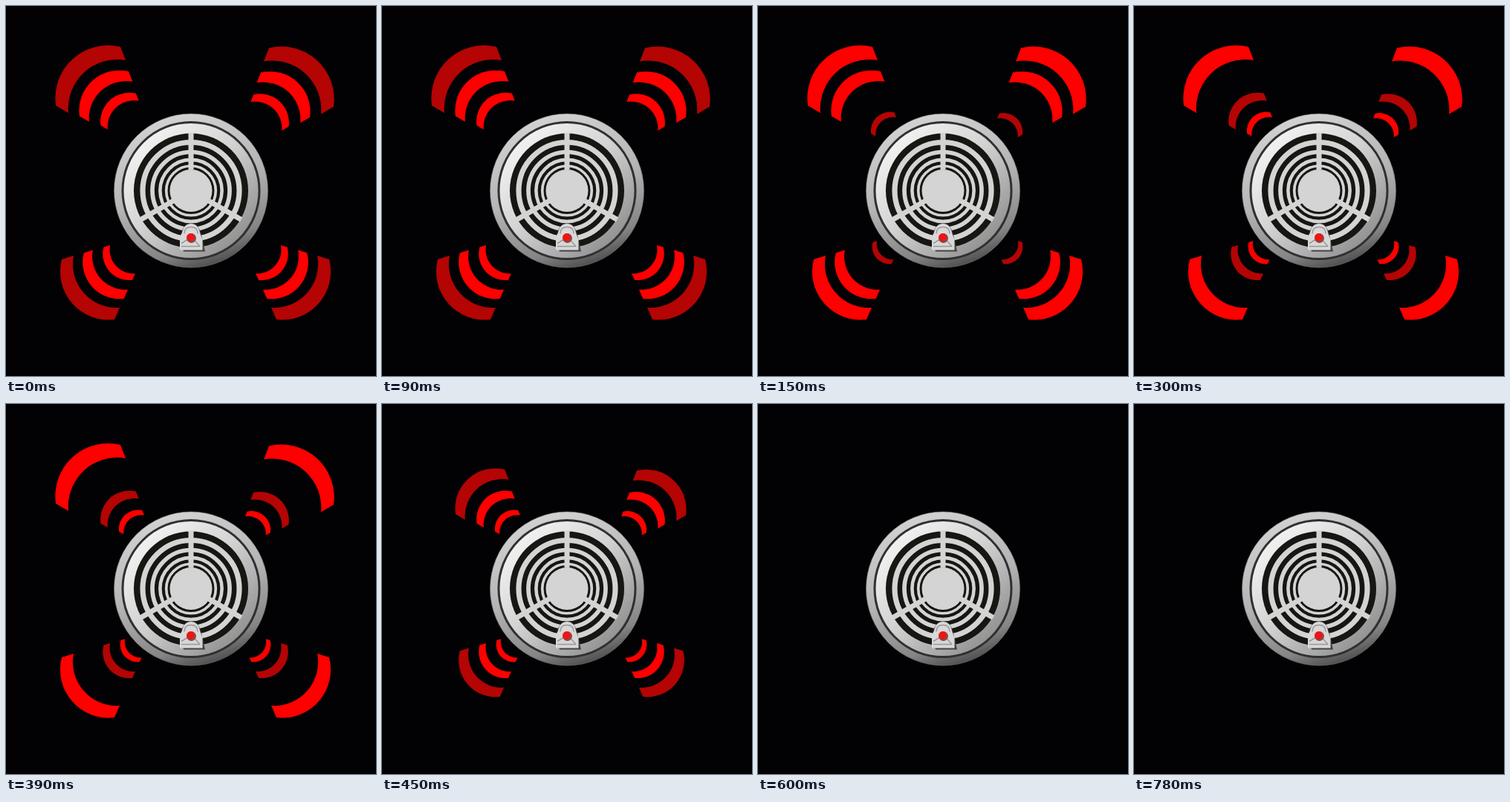
An HTML page for the animation above (0.9 s loop, 498 by 498 pixels).

```html
<!DOCTYPE html>
<html lang="en">
<head>
<meta charset="utf-8">
<title>Smoke alarm</title>
<style>
html, body { margin: 0; width: 100%; height: 100%; overflow: hidden; background: #020103; }
svg { display: block; width: 100%; height: 100%; }
</style>
</head>
<body>
<svg viewBox="0 0 498 498">
  <defs>
    <linearGradient id="rim" x1=".3" y1="0" x2=".62" y2="1">
      <stop offset="0" stop-color="#d4d4d4"/>
      <stop offset=".5" stop-color="#b4b4b4"/>
      <stop offset=".85" stop-color="#858585"/>
      <stop offset="1" stop-color="#4c4c4c"/>
    </linearGradient>
    <linearGradient id="face" x1=".12" y1=".15" x2=".82" y2=".9">
      <stop offset="0" stop-color="#f2f2f2"/>
      <stop offset=".45" stop-color="#d4d4d4"/>
      <stop offset="1" stop-color="#929292"/>
    </linearGradient>
  </defs>
  <g id="waves"></g>
  <g transform="translate(249 248.5)">
    <circle r="103.500" fill="url(#rim)" stroke="#777" stroke-opacity=".6"/>
    <circle r="92" fill="url(#face)" stroke="#303030" stroke-width="3"/>
    <circle r="77" fill="#161612"/>
    <g id="grille" fill="none" stroke="#d4d4d4"></g>
    <circle r="28.500" fill="#d4d4d4"/>
    <path d="M-10 82L-14 60Q-11 45 0 45T14 60L19 82Z" fill="#444"/>
    <path d="M-15 80V62L-12 57Q-10 44.500 0 44.500T12 57L15.500 66V80Z" fill="#d8d8d8"/>
    <path d="M-9 58Q-9 49 0 49T9 58M-13 71L-5 66M4 66L12 75M-13 75H12" fill="none" stroke="#999" stroke-width="1.500"/>
    <circle cx=".5" cy="64" r="6.500" fill="#8a4a48"/>
    <circle cx="-.5" cy="62.700" r="5.300" fill="#f01414"/>
  </g>
</svg>
<script>
const NS = 'http://www.w3.org/2000/svg';
const byId = id => document.getElementById(id);
function add(parent, tag, attrs) {
  const el = document.createElementNS(NS, tag);
  for (const k in attrs) el.setAttribute(k, attrs[k]);
  return parent.appendChild(el);
}

// Light rings shrink by a fixed ratio towards the hub
const grille = byId('grille');
for (let i = 0; i < 4; i++) {
  const r = 65 * 0.8 ** i;
  add(grille, 'circle', { r, 'stroke-width': r * 0.11 });
}
for (let i = 0; i < 3; i++)
  add(grille, 'path', { d: 'M0-28V-78', 'stroke-width': 7, transform: `rotate(${i * 120})` });

// A curved band: outer edge a to b, inner edge c to d
function bandPath(a, b, c, d) {
  const arc = (p, q, bend, sweep) => {
    const r = Math.hypot(p[0] - q[0], p[1] - q[1]) * bend;
    return `A${r} ${r} 0 0 ${sweep} ${q}`;
  };
  const turn = a[1] < 0 ? 0 : 1;
  return `M${a}${arc(a, b, 0.605, turn)}L${c}${arc(c, d, 0.63, 1 - turn)}Z`;
}
const upper = bandPath([-46, -138], [-133, -59], [-116, -49], [-39, -120]);
const lower = bandPath([-53, 117], [-124, 36], [-108, 31], [-46, 101]);

// Bands grow away from a focus in each corner; side -1 mirrors them
const corners = [
  { d: upper, x: 200, y: 193, side: 1 },
  { d: upper, x: 308, y: 194.5, side: -1 },
  { d: lower, x: 199, y: 305, side: 1 },
  { d: lower, x: 311, y: 305, side: -1 }
];
const ranks = [0.36, 0.545, 0.76, 1].map(size => {
  const g = add(byId('waves'), 'g', {});
  for (const { d, x, y, side } of corners)
    add(g, 'path', { d, transform: `translate(${x} ${y}) scale(${side * size} ${size})` });
  return g;
});

// The dark leading rank moves outward with a gap ahead; the last 300 ms are silent
const STEP = 150, LOOP = 900;
function draw(ms) {
  const step = Math.floor((ms % LOOP) / STEP);
  ranks.forEach((g, i) => {
    const shown = step < 4 && i !== step;
    g.setAttribute('visibility', shown ? 'visible' : 'hidden');
    g.setAttribute('fill', i === (step + 3) % 4 ? '#b40404' : '#ff0000');
  });
}

let start;
function tick(now) {
  start ??= now;
  draw(Math.max(0, now - start));
  requestAnimationFrame(tick);
}
draw(0);
requestAnimationFrame(tick);
</script>
</body>
</html>
```
